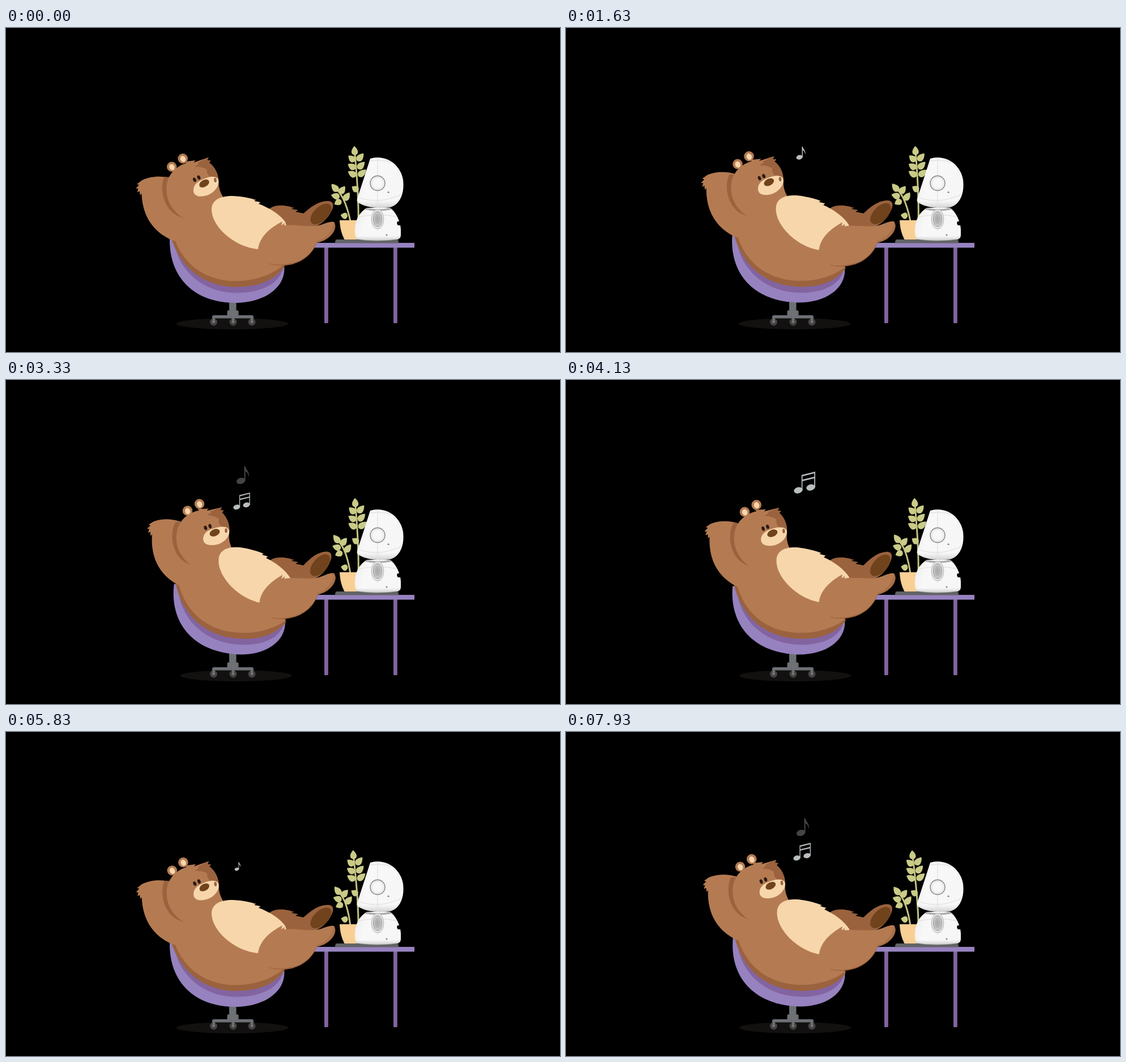
An HTML page that plays this animation: 978 px wide and 573 px high, repeating every 8000 ms.

```html
<!DOCTYPE html>
<html lang="en">
<head>
<meta charset="utf-8">
<title>Whistling bear</title>
<style>
  html, body { margin: 0; width: 100%; height: 100%; overflow: hidden; background: #000; }
  svg { display: block; width: 100vw; height: 100vh; }
  .fur { fill: #b47b52; }
  .shade { fill: #9b623e; }
  .cream { fill: #f7d6ac; }
  .dark { fill: #70431c; }
  .lilac { fill: #9682bf; }
  .plum { fill: #8264a1; }
  .steel { fill: #6d7074; }
  .leaf { fill: #cacb87; }
  .stem { fill: none; stroke: #c3c27f; stroke-width: 3; stroke-linecap: round; }
  .note { fill: #b9bec0; }
</style>
</head>
<body>
<svg viewBox="0 0 978 573" xmlns="http://www.w3.org/2000/svg">
  <defs>
    <linearGradient id="shell" x1="0" y1="0" x2="1" y2=".2">
      <stop offset="0" stop-color="#ececec"/>
      <stop offset=".3" stop-color="#f8f8f8"/>
      <stop offset="1" stop-color="#f6f6f6"/>
    </linearGradient>
    <linearGradient id="shellShade" x1="0" y1="0" x2="0" y2="1">
      <stop offset=".86" stop-color="#bbb" stop-opacity="0"/>
      <stop offset="1" stop-color="#aaa" stop-opacity=".5"/>
    </linearGradient>
    <radialGradient id="lens">
      <stop offset="0" stop-color="#aaa"/>
      <stop offset=".6" stop-color="#b4b4b4"/>
      <stop offset="1" stop-color="#d8d8d8"/>
    </radialGradient>
    <path id="headShell" d="M643 231Q649 229 656 229A45.500 47 0 0 1 701.500 276C702 300 691 314 678 317C655 320 635 317 622 309C618 306 620 302 621 299Z"/>
    <path id="bodyShell" d="M637 318H678C688 325 696 341 697 356V366Q697 372 692 373Q655 378 619 373C613 362 616 341 624 330Q630 322 637 318Z"/>
  </defs>

  <!-- floor shadow and chair base -->
  <ellipse id="shadow" cx="399.5" cy="523" rx="98.5" ry="10" fill="#13110f"/>
  <g class="steel">
    <rect x="394" y="480" width="12.5" height="22"/>
    <rect x="390.5" y="499.5" width="20" height="12" rx="2"/>
    <path d="M364 517V511Q364 508 367 508H434Q437 508 437 511V517H433V513.500H368V517Z"/>
    <rect x="398.500" y="511" width="5" height="6"/>
  </g>
  <g id="wheels"></g>

  <!-- plant -->
  <g id="tall"><path class="stem" d="M622 342C623 300 619 255 616 222"/></g>
  <g id="short"><path class="stem" d="M608 342C604 323 598 301 586 288"/></g>
  <path d="M589 340H628V375H598C592 364 589.500 352 589 340Z" fill="#f8cf94"/>

  <!-- desk -->
  <rect class="plum" x="562" y="386" width="6.800" height="136" rx="1"/>
  <rect class="plum" x="684" y="386" width="6.800" height="136" rx="1"/>
  <rect class="lilac" x="541" y="380" width="180" height="8.500"/>
  <path d="M584 374H690Q693 374 693 380.500H581Q581 374 584 374Z" fill="#626365"/>

  <!-- robot -->
  <path d="M619 368H693V374Q655 379 619 374Z" fill="#9a9a9a"/>
  <use href="#bodyShell" fill="url(#shell)"/>
  <use href="#bodyShell" fill="url(#shellShade)"/>
  <path d="M637 318Q658 323 678 318L681 321Q658 326 633 321Z" fill="#aaa"/>
  <use href="#headShell" fill="url(#shell)"/>
  <use href="#headShell" fill="url(#shellShade)"/>
  <g fill="none" stroke="#dcdcdc" stroke-width="1">
    <path d="M656 229V261M656 288V318M641 236Q663 231 684 239M626 301Q660 312 699 294M623 334Q640 331 645 331M667 331Q680 331 690 334"/>
    <circle cx="656" cy="274.500" r="10"/>
  </g>
  <circle cx="656" cy="274.500" r="13" fill="none" stroke="#969696" stroke-width="1.800"/>
  <ellipse cx="656" cy="338" rx="11" ry="17.500" fill="#dedede" stroke="#bbb"/>
  <ellipse cx="656" cy="338" rx="7.500" ry="13" fill="url(#lens)" stroke="#929292"/>
  <circle cx="675" cy="290.500" r="1.600" fill="#888"/>
  <circle cx="672" cy="366" r="1.600" fill="#888"/>
  <path d="M698 342L691 342Q689 346 692 349L698 349Z" fill="#000"/>
  <circle cx="710" cy="252" r=".7" fill="#333"/>

  <!-- bear -->
  <g id="chair">
    <path class="lilac" d="M289 373C288 443 334 486 405 486C457 486 495 458 491 421L400 380Z"/>
    <path class="plum" d="M296 373C302 428 347 468.500 408 468.500C450 468.500 483 452 489 425L400 380Z"/>
  </g>
  <path class="shade" d="M462 322C472 313 486 311 508 318L504 320L516 322L511 325L526 328L546 350L500 372L470 360Z"/>
  <g id="farFoot">
    <path class="shade" d="M523 330C533 321 549 306 568 306C578 306 580 313 575 323C568 338 555 349 541 353Z"/>
    <ellipse class="dark" cx="556" cy="329" rx="23" ry="12.500" transform="rotate(-44 556 329)"/>
  </g>
  <g id="torso">
    <path class="shade" d="M291 370C308 426 352 458 406 458C446 458 475 446 492 421L480 330L330 330Z"/>
    <path class="fur" d="M297 371C314 421 355 447.500 405 447.500C440 447.500 470 436 490 419L480 350L440 320L380 298L330 300Z"/>
  </g>
  <g id="arm">
    <path class="fur" d="M298 377L292 375C262 362 241 336 239 293L236.500 296L235.500 289L231.500 291L233 284.500L229 284L234.500 278L231 276.500L239 270C254 262 275 261 291 266L330 310L335 375Z"/>
  </g>
  <g id="head">
    <path class="shade" d="M279 263.500C269 286 279 329 313 336L320 300L291 264Z"/>
    <g id="ears"></g>
    <path class="fur" d="M283 286C282 264 296 246 318 239L314 237L334 234L331 238C340 235 350 231 357 229L355 234L361 234.500L358 238C368 245 375 258 375 272C375 284 378 291 384 301L345 345L313 336C294 325 283 306 283 286Z"/>
    <path class="shade" d="M332 246L340 240L337 239C345 235 351 231 357 229L355 234L361 234.500L358 238C367 245 372 254 374 265C362 267 354 262 354 250C347 246 340 245 332 246Z"/>
    <path class="cream" d="M330.500 286C331 275 342 269 354 265C366 261 374 263 375 271C375 281 368 290 357 295C344 300 330 299 330.500 286Z"/>
    <ellipse class="dark" cx="349.500" cy="275" rx="9.500" ry="6" transform="rotate(-30 349.500 275)"/>
    <ellipse class="shade" cx="369" cy="269" rx="2.300" ry="4" transform="rotate(-8 369 269)"/>
    <g fill="#2b1a12">
      <ellipse cx="332.500" cy="268.500" rx="2.700" ry="4" transform="rotate(-25 332.500 268.500)"/>
      <ellipse cx="340" cy="264.500" rx="2.700" ry="4" transform="rotate(-25 340 264.500)"/>
    </g>
  </g>
  <g id="belly">
    <path class="cream" d="M363 321C363 303 380 297 400 297C418 298 432 301 441 304L438 306L449 308L446 311C465 318 484 330 493 343L497 355L450 393L445 391C405 388 363 352 363 321Z"/>
  </g>
  <g id="nearLeg">
    <path class="shade" d="M464 417C502 428 538 410 549 379L520 375Z"/>
    <path class="fur" d="M445 392C447 371 463 355 488 342L486 349L492 345L491 349C512 347 530 352 548 350C560 348 570 341 579 343C585 352 578 364 570 370C563 376 556 378 548 380C540 399 524 412 504 416C490 419 477 420 464 416L440 410Z"/>
    <path class="shade" d="M579 343C585 352 578 364 570 370C563 376 556 378 548 380L547 377C562 374 576 362 579 343Z" opacity=".45"/>
  </g>

  <g id="notes" class="note"></g>
</svg>
<script>
const LOOP = 8000, STEP = 100, FIRST = 30;
const ROCK = 6000, SWAY = 11700, RISE = 3150;
const byId = id => document.getElementById(id);
const place = (id, value) => byId(id).setAttribute('transform', value);

function add(parent, tag, attrs) {
  const el = document.createElementNS('http://www.w3.org/2000/svg', tag);
  for (const key in attrs) el.setAttribute(key, attrs[key]);
  return parent.appendChild(el);
}

// Leaf from its base to its tip
function leaf(id, x, y, tipX, tipY) {
  const dx = tipX - x, dy = tipY - y, len = Math.hypot(dx, dy) * .95;
  const angle = Math.atan2(dx, -dy) * 180 / Math.PI;
  add(byId(id), 'path', {
    class: 'leaf',
    d: `M0 0C-8.5 -2 -6.5 ${-len * .6} 0 ${-len}C6.5 ${-len * .6} 8.5 -2 0 0Z`,
    transform: `translate(${x} ${y}) rotate(${angle})`
  });
}

[[616, 225, 615, 208], [616, 236, 604, 225], [620, 235, 632, 221],
 [617, 249, 603, 240], [621, 249, 634, 236], [618, 262, 603, 253],
 [622, 262, 637, 250], [622, 288, 610, 280]].forEach(p => leaf('tall', ...p));
[[586, 289, 574, 275], [589, 293, 599, 279], [589, 299, 573, 295],
 [597, 305, 607, 290], [592, 305, 579, 312], [603, 333, 590, 331]].forEach(p => leaf('short', ...p));

for (const x of [366.5, 401, 434]) {
  add(byId('wheels'), 'circle', { cx: x, cy: 520, r: 6.5, fill: '#424345' });
  add(byId('wheels'), 'circle', { cx: x, cy: 519.5, r: 2.5, fill: '#77797c' });
  add(byId('wheels'), 'rect', { x: x - 2, y: 512, width: 4, height: 7, fill: '#6d7074' });
}

for (const [x, y] of [[291.5, 246], [311, 231.5]]) {
  add(byId('ears'), 'circle', { cx: x, cy: y, r: 8.8, class: 'fur' });
  add(byId('ears'), 'ellipse', {
    cx: x, cy: y + .8, rx: 4.6, ry: 5.6, class: 'cream', transform: `rotate(-25 ${x} ${y})`
  });
}

const noteHead = (g, x, y) => add(g, 'ellipse', {
  cx: x, cy: y, rx: 7.8, ry: 5.4, transform: `rotate(-15 ${x} ${y})`
});

function drawSingle(g) {
  noteHead(g, 8, -6);
  add(g, 'path', { d: 'M14 -6V-32H16C17 -25 24 -23 22 -13C21 -19 19 -22 16 -23V-6Z' });
}

function drawPair(g) {
  noteHead(g, 8, -6);
  noteHead(g, 30, -11);
  add(g, 'path', { d: 'M13.800 -6V-33L38 -39V-11H36.300V-36L15.500 -30.700V-6ZM14 -24.500L37 -30V-27.300L14 -21.800Z' });
}

const notes = [[400, 13, drawSingle], [2000, 6, drawPair], [5000, 13, drawSingle], [6550, 6, drawPair]]
  .map(([start, drift, draw]) => {
    const g = add(byId('notes'), 'g', {});
    draw(g);
    return { g, start, drift };
  });

// 0 leaning back, 1 leaning forward; lag delays a part
const rock = (t, lag) => (1 - Math.cos(2 * Math.PI * (t - lag) / ROCK)) / 2;
const sway = (t, peak) => Math.cos(2 * Math.PI * (t - peak) / SWAY);

function moveNote({ g, start, drift }, t) {
  const age = t - start;
  const alive = age > 0 && age < RISE;
  g.setAttribute('display', alive ? 'inline' : 'none');
  if (!alive) return;
  const x = 396 + drift * Math.sin(Math.PI / 2 * age / 2100);
  const y = 257.5 - 37 * (1 - Math.cos(Math.PI * age / RISE));
  g.setAttribute('transform', `translate(${x} ${y}) scale(${Math.min(1, age / 1700)})`);
  g.setAttribute('opacity', Math.min(1, (3200 - age) / 750));
}

function render(t) {
  const seat = rock(t, -50), nod = rock(t, 200), turn = rock(t, 430), perk = rock(t, 600);
  const lean = `rotate(${6 * seat} 416 443)`;
  for (const id of ['chair', 'torso', 'belly']) place(id, lean);
  place('arm', `rotate(${6.8 * rock(t, 180)} 418 443)`);
  place('head', `translate(${19 * nod} ${-5 * nod}) rotate(${7 * turn - .4} 350 275)`);
  place('ears', `translate(${6 * perk} ${-4 * perk})`);
  place('farFoot', `rotate(${-5.5 * rock(t, 300)} 540 345)`);
  place('nearLeg', `rotate(${-2.5 * seat} 548 340)`);
  place('shadow', `translate(${7 * rock(t, 0)} 0)`);
  place('tall', `rotate(${1.25 * (sway(t, 2100) - .44)} 622 340)`);
  place('short', `rotate(${2.4 * (sway(t, 5800) + 1)} 608 340)`);
  notes.forEach(n => moveNote(n, t));
}

function tick() {
  const t = performance.now() % LOOP;
  render(Math.floor((t - FIRST) / STEP) * STEP + FIRST);
  requestAnimationFrame(tick);
}
tick();
</script>
</body>
</html>
```
